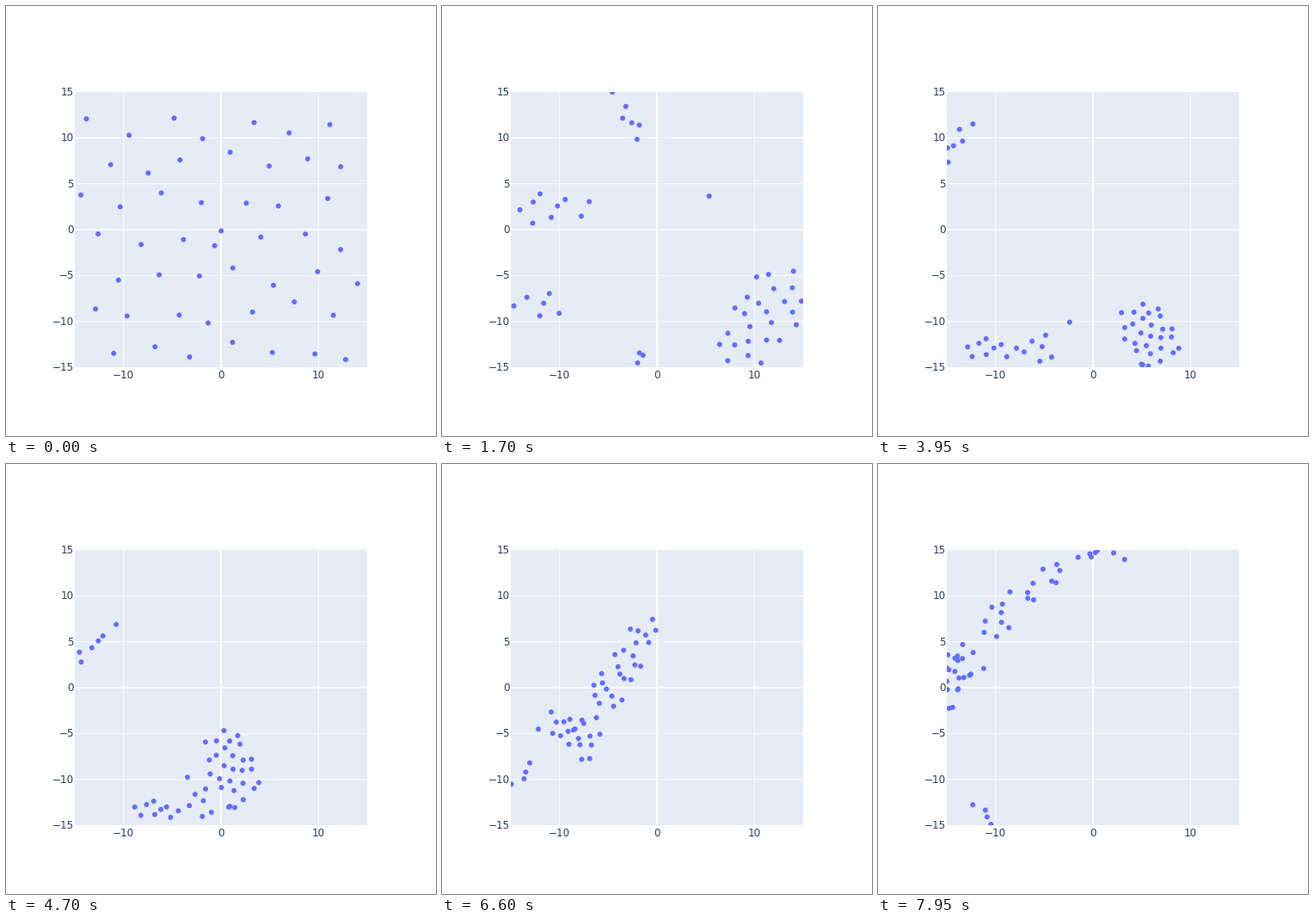
A matplotlib script that plays this animation: 500 by 500 pixels, repeating every 8000 ms.

```python
import numpy as np
import matplotlib.pyplot as plt
from matplotlib.animation import FuncAnimation
from matplotlib.patches import Rectangle

SIZE, DPI, WALL = 500, 100, 15
FRAMES, INTERVAL = 160, 50
PX = 72 / DPI
GOLDEN = np.pi * (3 - np.sqrt(5))
TIMES = np.array([0, 34, 60, 79, 108, 132, 159])
rng = np.random.default_rng(4)

# name: count, then ellipses (x, y, half length, half width, angle)
# for where the flock is scattered, gathers and merges with the others
FLOCKS = {
    "north": (6, (6, 9, 5, 4, -61), (-3, 12.4, 3.3, .9, -61),
              (-12.5, -.2, 3.7, .6, 227)),
    "loner": (1, (11.5, 13.8, 0, 0, 0), (5.35, 3.65, 0, 0, 0),
              (-4.1, -7, 0, 0, 0)),
    "west": (9, (-9, 9, 6, 6, 0), (-11, 2.4, 4.5, 1.9, 0),
             (-4.4, -11, 2, 1, -20)),
    "corner": (6, (-11, -2, 5, 5, 0), (-12.3, -8.1, 2.9, 1.9, 0),
               (-1.2, -11.5, 1.1, 1.8, 0)),
    "floor": (3, (-9, -11, 4, 4, 90), (-1.8, -13.9, 1.2, .4, 90),
              (-3.3, -10.2, .9, .4, 90)),
    "east": (25, (5, -4, 10, 10, 55), (10.8, -9.7, 6.6, 3.6, 55),
             (-2.2, -4.9, 4.8, 2, 270)),
}


def disc(n):
    """Evenly spread points in the unit disc, slightly disturbed."""
    k = np.arange(n)
    r = np.sqrt((k + .5) / n)
    pts = np.column_stack([r * np.cos(k * GOLDEN), r * np.sin(k * GOLDEN)])
    return pts + rng.normal(0, .04, pts.shape)


def ellipse(pts, x, y, a, b, angle):
    t = np.radians(angle)
    turn = np.array([[np.cos(t), np.sin(t)], [-np.sin(t), np.cos(t)]])
    return pts * (a, b) @ turn + (x, y)


def affine(p, matrix, shift):
    return p @ np.transpose(matrix) + shift


def fold(v):
    """Reflect coordinates back between the walls."""
    return WALL - np.abs((v + WALL) % (4 * WALL) - 2 * WALL)


COUNTS = [row[0] for row in FLOCKS.values()]
ENDS = np.cumsum(COUNTS)
DOTS = ENDS[-1]
DISCS = [disc(n) for n in COUNTS]
NORTH, LONER, WEST, CORNER, FLOOR, EAST = (
    slice(end - n, end) for n, end in zip(COUNTS, ENDS))


def layout(stage):
    return np.vstack([ellipse(d, *row[stage])
                      for d, row in zip(DISCS, FLOCKS.values())])


def scatter_dots(wanted):
    """Even random cloud, each dot handed to the nearest wanted place."""
    k = np.arange(DOTS)[:, None]
    cloud = (.5 + k * (.7548777, .5698403)) % 1 * 2 - 1
    cloud = list(cloud * 14.4 + rng.uniform(-.6, .6, cloud.shape))
    return np.array([
        cloud.pop(int(np.argmin(np.hypot(*(np.array(cloud) - w).T))))
        for w in wanted])


START = scatter_dots(layout(1))
GATHER, MERGE = layout(2), layout(3)
ORDER = np.argsort(MERGE[NORTH, 1])
STRAYS, JOINERS = ORDER[:4], ORDER[4:]


def drift(p):
    q = p.copy()
    q[NORTH] += (-9.1, .5)
    q[LONER] += (-4.5, -7.95)
    q[WEST] += (-3.6, -8.3)
    q[CORNER] = (p[CORNER] - (-12.5, -8.1)) * .75 + (-12.3, -15.6)
    q[FLOOR] += (9.1, .3)
    q[EAST] = (p[EAST] - (10.5, -10)) * (.55, .45) + (17.7, -17.2)
    return q


def approach(p):
    q = affine(MERGE, [[1.5, -.2], [0, .72]], (8.06, -7.64))
    q[NORTH] = p[NORTH] + (-4, -3)
    q[LONER] = (-2.4, -10.1)
    low = slice(WEST.start, CORNER.stop)
    q[low] = affine(MERGE[low], [[1.6, 0], [.2, 1.2]], (-3.7, 1.14))
    return q


def lean(p):
    q = affine(p, [[.862, .672], [-.322, 1.242]], (1.77, 7.635))
    q[JOINERS] = p[JOINERS] + (-.6, -5)
    q[STRAYS] = p[STRAYS] + (-.3, -8.3)
    return q


def fan_out(p):
    y = p[:, 1]
    turn = np.radians(116 - 5.11 * y - .204 * y ** 2)
    q = p + 9.35 * np.column_stack([np.cos(turn), np.sin(turn)])
    q[STRAYS] = p[STRAYS] + (2.6, -6.7)
    return q


def build_path():
    """Unfolded key positions, so that bounces become smooth motion."""
    moves = [lambda p: GATHER, drift, approach, lambda p: MERGE, lean, fan_out]
    pos, sign = START, np.ones_like(START)
    path = [START]
    for move in moves:
        goal = move(pos)
        path.append(path[-1] + sign * (goal - pos))
        sign = np.where(np.abs(goal) > WALL, -sign, sign)
        pos = fold(goal)
    return np.array(path)


PATH = build_path()
SPEED = np.gradient(PATH, TIMES, axis=0)


def positions(frame):
    i = min(np.searchsorted(TIMES, frame, side="right") - 1, len(TIMES) - 2)
    h = TIMES[i + 1] - TIMES[i]
    u = (frame - TIMES[i]) / h
    blend = u * u * (3 - 2 * u)
    p = PATH[i] + blend * (PATH[i + 1] - PATH[i])
    p = p + h * u * (1 - u) * ((1 - u) * SPEED[i] - u * SPEED[i + 1])
    return fold(p)


fig = plt.figure(figsize=(SIZE / DPI, SIZE / DPI), dpi=DPI, facecolor="white")
ax = fig.add_axes([80 / SIZE, 80 / SIZE, 340 / SIZE, 320 / SIZE])
ax.set_xlim(-WALL, WALL)
ax.set_ylim(-WALL, WALL)
ax.axis("off")
ax.add_patch(Rectangle((-WALL, -WALL), 2 * WALL, 2 * WALL,
                       fc="#e5ecf6", lw=0, zorder=0))


def label(x, y, value, align):
    text = str(value).replace("-", "\u2212")
    fig.text(x / SIZE, 1 - y / SIZE, text, ha=align, va="baseline",
             family="DejaVu Sans", size=12 * PX, color="#2a3f5f")


def grid_line(draw_line, value):
    draw_line(value, color="white", lw=(1 if value else 2) * PX,
              snap=False, zorder=1)


for x in (-10, 0, 10):
    grid_line(ax.axvline, x)
    label(250 + x * 340 / 30, 433, x, "center")
for y in range(-15, 16, 5):
    if abs(y) < WALL:
        grid_line(ax.axhline, y)
    label(79, 264 - y * 320 / 30, y, "right")

# One colour per dot keeps sub-pixel placement
dots = ax.scatter(*START.T, s=(6 * PX) ** 2, c=["#636efa"] * DOTS,
                  linewidths=0, zorder=3)


def draw(frame):
    dots.set_offsets(positions(frame))
    return [dots]


anim = FuncAnimation(fig, draw, frames=FRAMES, interval=INTERVAL, repeat=True)
plt.show()
```
